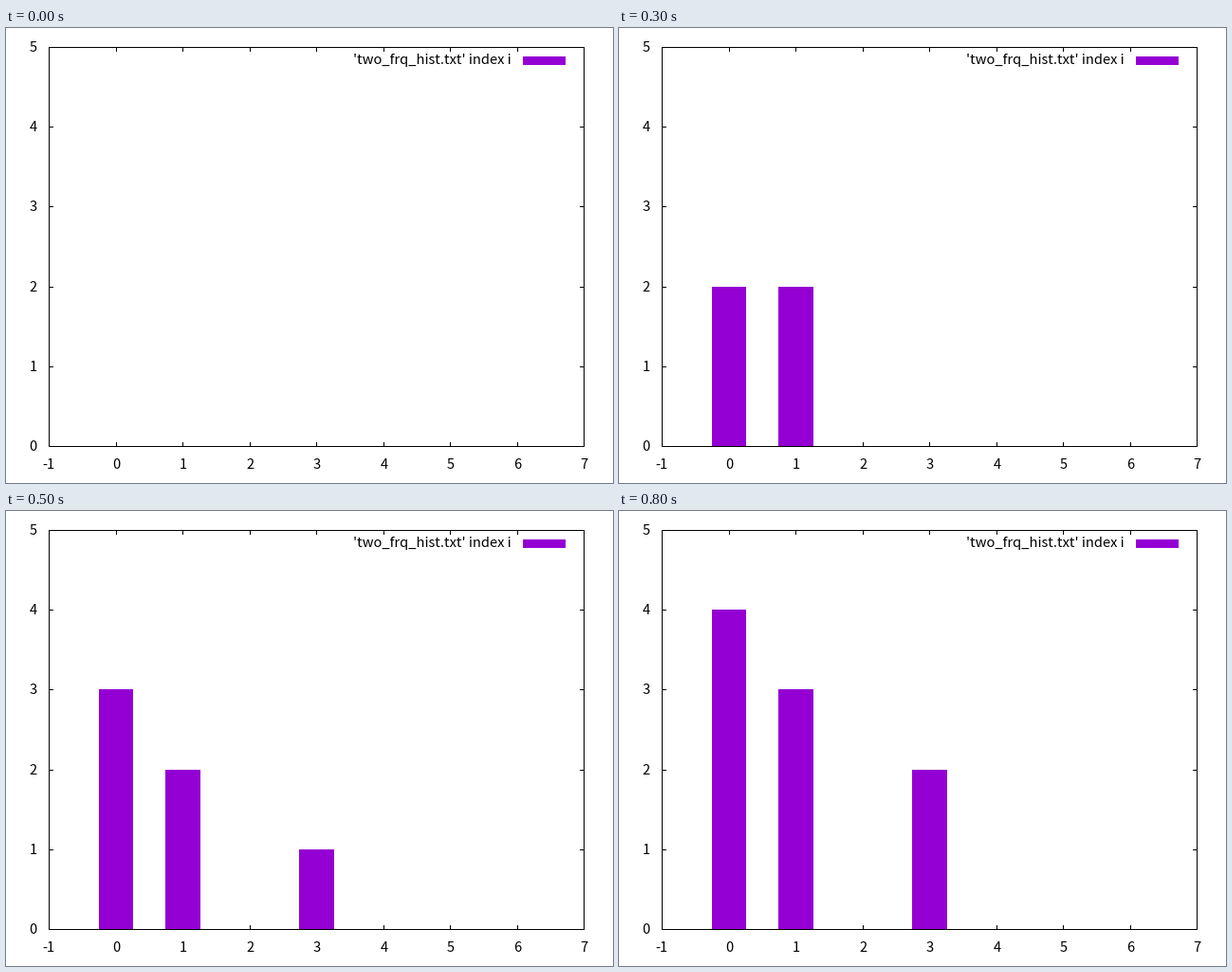
A matplotlib script that plays this animation: 640 px wide and 480 px high, repeating every 0.9 s.

```python
import math

import matplotlib.pyplot as plt
from matplotlib.animation import FuncAnimation
from matplotlib.patches import Rectangle

W, H, DPI = 640, 480, 100
LEFT, RIGHT, TOP, BOTTOM = 45, 609, 20, 441
X_MIN, X_MAX, Y_MAX = -1, 7, 5
TICK = 5
VIOLET = "#9400d3"
FONT = dict(family="Noto Sans CJK JP", size=14.67 * 72 / DPI, color="black")

# Values in the order they are counted; the first two arrive together.
HITS = [0, 1, 0, 1, 0, 3, 3, 0, 1]
BINS = sorted(set(HITS))

fig = plt.figure(figsize=(W / DPI, H / DPI), dpi=DPI, facecolor="white")
ax = fig.add_axes([0, 0, 1, 1])
ax.set_xlim(0, W)
ax.set_ylim(H, 0)
ax.axis("off")


def px(x):
    return LEFT + 0.5 + (x - X_MIN) * (RIGHT - LEFT) / (X_MAX - X_MIN)


def py(y):
    return BOTTOM + 0.5 - y * (BOTTOM - TOP) / Y_MAX


def box(x0, y0, x1, y1, color="black", z=1):
    rect = Rectangle((x0, y0), x1 - x0, y1 - y0, facecolor=color,
                     linewidth=0, snap=False, zorder=z)
    return ax.add_patch(rect)


def label(x, y, text, ha):
    ax.text(x, y, text, ha=ha, va="baseline", **FONT)


def draw_frame():
    for y in (TOP, BOTTOM):
        box(LEFT, y, RIGHT + 1, y + 1, z=3)
    for x in (LEFT, RIGHT):
        box(x, TOP, x + 1, BOTTOM + 1, z=3)


def draw_ticks():
    for v in range(X_MIN, X_MAX + 1):
        x = math.floor(px(v))
        box(x, TOP, x + 1, TOP + TICK)
        box(x, BOTTOM + 1 - TICK, x + 1, BOTTOM + 1)
        label(x + (0.5 if v >= 0 else -0.5), 465, str(v), "center")
    for v in range(Y_MAX + 1):
        y = math.floor(py(v))
        box(LEFT, y, LEFT + TICK, y + 1)
        box(RIGHT + 1 - TICK, y, RIGHT + 1, y + 1)
        label(32.4, y + 5, str(v), "right")


def draw_key():
    label(532.6, 38, "'two_frq_hist.txt' index i", "right")
    box(545, 30, 590, 39, VIOLET)


draw_frame()
draw_ticks()
draw_key()
bars = [box(math.floor(px(b - 0.25)), BOTTOM, math.ceil(px(b + 0.25)), BOTTOM,
            VIOLET, 2) for b in BINS]


def update(n):
    seen = HITS[:n + 1] if n else []
    for b, bar in zip(BINS, bars):
        top = math.floor(py(seen.count(b)))
        bar.set_y(top)
        bar.set_height(BOTTOM - top)
    return bars


anim = FuncAnimation(fig, update, frames=len(HITS), interval=100,
                     repeat=True, repeat_delay=0, blit=False)
plt.show()
```
